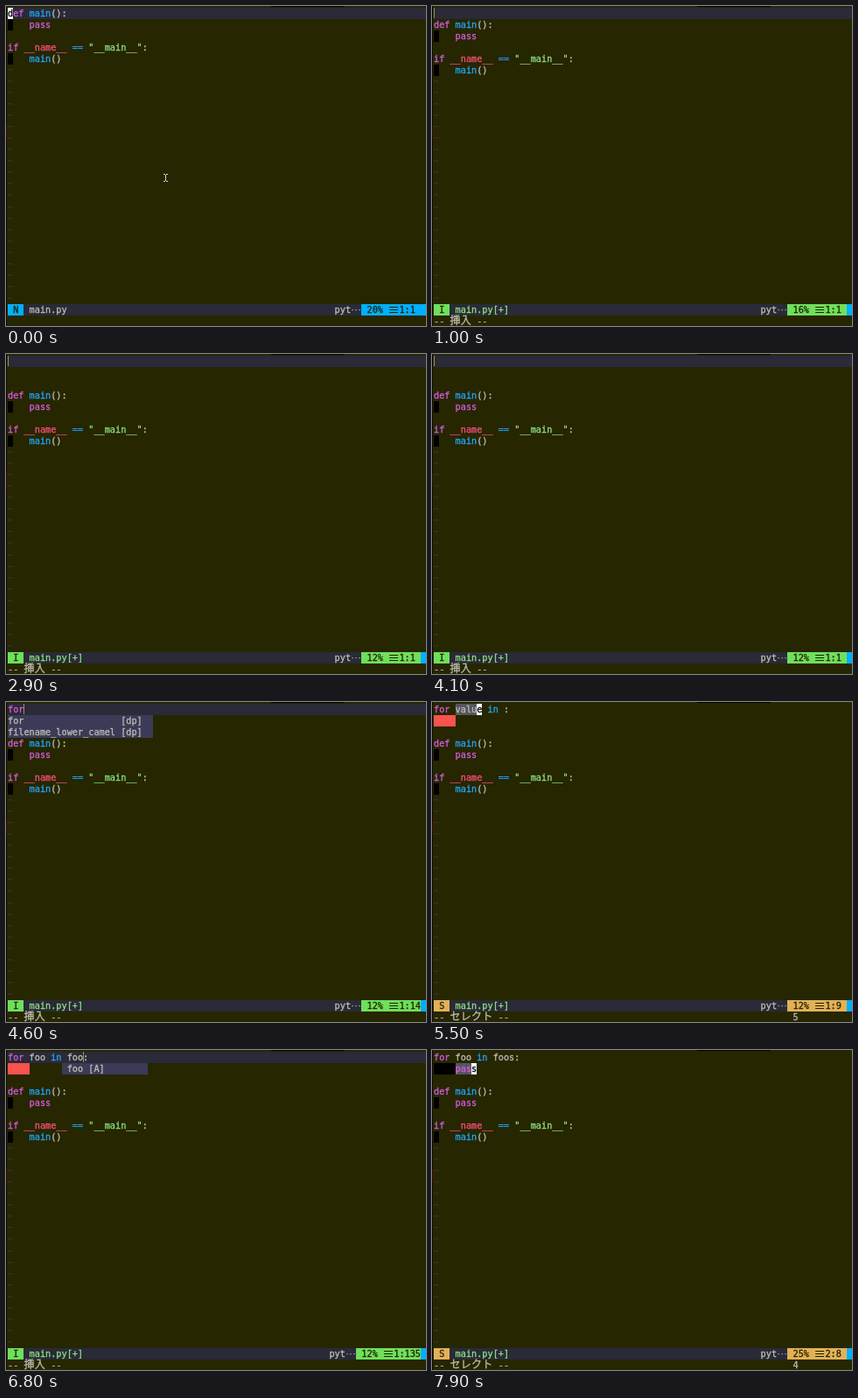
Recreate the animation shown at these times as an HTML page with a canvas. Size 480 px wide and 366 px high, loop 8 s.

```html
<!DOCTYPE html>
<html lang="en">
<head>
<meta charset="utf-8">
<title>Snippet expansion in a text editor</title>
<style>
html, body { margin: 0; width: 100%; height: 100%; overflow: hidden; background: #262600; }
canvas { display: block; }
</style>
</head>
<body>
<canvas id="stage" width="480" height="366"></canvas>
<script>
const ctx = document.getElementById("stage").getContext("2d");
const LOOP = 8000, CELL = 6.15, LEFT = 2, LAST_ROW = 25;
const C = {
  bg: "#262600", line: "#2a2a38", menu: "#3b3b58", text: "#bebeb2", dark: "#222200",
  purple: "#d65cdc", blue: "#1fa8fa", red: "#fa4f78", green: "#90e080",
  tilde: "#34343c", warn: "#f8534c", select: "#555560", bar: "#a09060"
};
const MODES = {
  N: { color: "#00afff", message: "" },
  I: { color: "#6fdf5c", message: "-- 挿入 --" },
  S: { color: "#e2b157", message: "-- セレクト --" }
};
const BODY = ["def main():", "    pass", "", 'if __name__ == "__main__":', "    main()"];
const BLANK = ["", "", ""];
const FOR_MENU = { col: 0, width: 27, items: ["for                  [dp]", "filename_lower_camel [dp]"] };
const FOO_MENU = { col: 10, width: 16, items: [" foo [A]"] };
const loopHead = (name, list) => [`for ${name} in ${list}:`, "    ", ""];

// start time, mode, lines above the body, cursor row, cursor column, position label, extras
const STEPS = [
  [0, "N", [], 0, 0, "20% ☰1:1 ", { pointer: true }],
  [1000, "I", [""], 0, 0, "16% ☰1:1 "],
  [1300, "I", ["", ""], 1, 0, "128% ☰21 "],
  [1700, "I", BLANK, 2, 0, "137% ☰31 "],
  [2000, "N", BLANK, 2, 0, "37% ☰3:1 "],
  [2600, "N", BLANK, 0, 0, "12% ☰1:1 "],
  [2800, "I", BLANK, 0, 0, "12% ☰1:1 "],
  [4200, "I", ["f", "", ""], 0, 1, "12% ☰1:12"],
  [4400, "I", ["fo", "", ""], 0, 2, "12% ☰1:13", { menu: FOR_MENU }],
  [4500, "I", ["for", "", ""], 0, 3, "12% ☰1:14", { menu: FOR_MENU }],
  [5100, "S", loopHead("value", ""), 0, 8, "12% ☰1:9 ", { from: 4 }],
  [5600, "I", loopHead("f", ""), 0, 5, "12% ☰1:6 "],
  [5800, "I", loopHead("fo", ""), 0, 6, "12% ☰1:67"],
  [5900, "I", loopHead("foo", ""), 0, 7, "12% ☰1:68"],
  [6200, "S", loopHead("foo", "list"), 0, 14, "12% ☰1:15 ", { from: 11 }],
  [6500, "I", loopHead("foo", "f"), 0, 12, "12% ☰1:13 "],
  [6600, "I", loopHead("foo", "fo"), 0, 13, "12% ☰1:134", { menu: FOO_MENU }],
  [6700, "I", loopHead("foo", "foo"), 0, 14, "12% ☰1:135", { menu: FOO_MENU }],
  [7000, "I", loopHead("foo", "foos"), 0, 15, "12% ☰1:136"],
  [7400, "S", ["for foo in foos:", "    pass", ""], 1, 7, "25% ☰2:8 ", { from: 4 }]
];

const rowY = row => Math.round(2 + row * 13.03);
const colX = col => LEFT + col * CELL;

function rect(x, y, w, h, color) {
  ctx.fillStyle = color;
  ctx.fillRect(x, y, w, h);
}

function fillCells(col, row, count, color) {
  const x = Math.round(colX(col));
  rect(x, rowY(row), Math.round(colX(col + count)) - x, rowY(row + 1) - rowY(row), color);
}

// Wide glyphs take two cells; the menu sign and the dots are drawn by hand.
function write(text, x, row, color) {
  const y = rowY(row);
  ctx.fillStyle = ctx.strokeStyle = color;
  ctx.lineWidth = 0.3;
  for (const ch of text) {
    const wide = ch > "\u2000";
    if (ch === "☰") {
      for (let i = 0; i < 3; i++) ctx.fillRect(x + 1, y + 3 + i * 3, 10, 1);
    } else if (ch === "⋯") {
      for (let i = 0; i < 3; i++) ctx.fillRect(x + 1.5 + i * 4, y + 6, 1.2, 1.2);
    } else {
      ctx.font = wide
        ? '12px "Noto Sans CJK JP", "Noto Sans CJK", sans-serif'
        : '10.2px "DejaVu Sans Mono", monospace';
      ctx.fillText(ch, x, y + 10);
      ctx.strokeText(ch, x, y + 10);
    }
    x += wide ? 2 * CELL : CELL;
  }
}

function tokenColor(token) {
  if (/^"/.test(token)) return C.green;
  if (token === "__name__") return C.red;
  if (/^(def|pass|if|for)$/.test(token)) return C.purple;
  if (/^(main|in|==)$/.test(token)) return C.blue;
  return C.text;
}

function writeCode(line, row) {
  for (const m of line.matchAll(/"[^"]*"|\w+|==|[^\s\w]/g)) {
    write(m[0], colX(m.index), row, tokenColor(m[0]));
  }
}

function drawStatus(mode, label, changed) {
  const { color, message } = MODES[mode];
  const row = 26, y = rowY(row), h = rowY(27) - y;
  const boxX = 474 - CELL * ([...label].length + 2);
  rect(LEFT, y, 478, h, C.line);
  fillCells(0, row, 3, color);
  write(mode, colX(1), row, C.dark);
  write(changed ? "main.py[+]" : "main.py", colX(4), row, changed ? C.green : C.text);
  write("pyt⋯", boxX - 5 * CELL, row, C.text);
  rect(Math.round(boxX), y, 480 - Math.round(boxX), h, MODES.N.color);
  rect(Math.round(boxX), y, 474 - Math.round(boxX), h, color);
  write(label, boxX + CELL, row, C.dark);
  write(message, LEFT, 27, C.text);
}

function drawMenu(menu) {
  menu.items.forEach((item, i) => {
    fillCells(menu.col, i + 1, menu.width, C.menu);
    write(item, colX(menu.col), i + 1, C.text);
  });
}

function drawPointer(x, y) {
  rect(x, y - 3, 1, 7, "#d8d8d0");
  for (const dy of [-4, 4]) {
    rect(x - 2, y + dy, 2, 1, "#d8d8d0");
    rect(x + 1, y + dy, 2, 1, "#d8d8d0");
  }
}

function drawCursor(mode, line, row, col) {
  if (mode === "I") {
    rect(Math.round(colX(col)), rowY(row), 1, 12, C.bar);
  } else {
    fillCells(col, row, 1, "#ffffff");
    write(line[col] || "", colX(col), row, "#000");
  }
}

function draw(time) {
  const step = STEPS.findLast(s => s[0] <= time);
  const [, mode, head, row, col, label, extra = {}] = step;
  const lines = [...head, ...BODY];

  rect(0, 0, 480, 366, C.bg);
  rect(0, 0, 1, 366, "#0c0c04");
  rect(0, 137, 1, 14, "#400808");
  rect(303, 0, 84, 1, "#000");
  if (mode !== "S") rect(LEFT, rowY(row), 478, 13, C.line);

  lines.forEach((line, i) => {
    if (line === "    ") fillCells(0, i, 4, C.warn);
    else if (line.startsWith("    ")) fillCells(0, i, mode === "S" && i === row ? 4 : 1, "#000");
    if (mode === "S" && i === row) fillCells(extra.from, i, col - extra.from, C.select);
    writeCode(line, i);
  });
  for (let i = lines.length; i <= LAST_ROW; i++) write("~", LEFT, i, C.tilde);

  if (extra.menu) drawMenu(extra.menu);
  drawCursor(mode, lines[row], row, col);
  if (extra.pointer) drawPointer(182, 196);
  drawStatus(mode, label, head.length > 0);
  if (mode === "S") write(String(col - extra.from + 1), 412.5, 27, C.text);
}

const start = performance.now();
function tick() {
  draw((performance.now() - start) % LOOP);
  requestAnimationFrame(tick);
}
tick();
</script>
</body>
</html>
```
